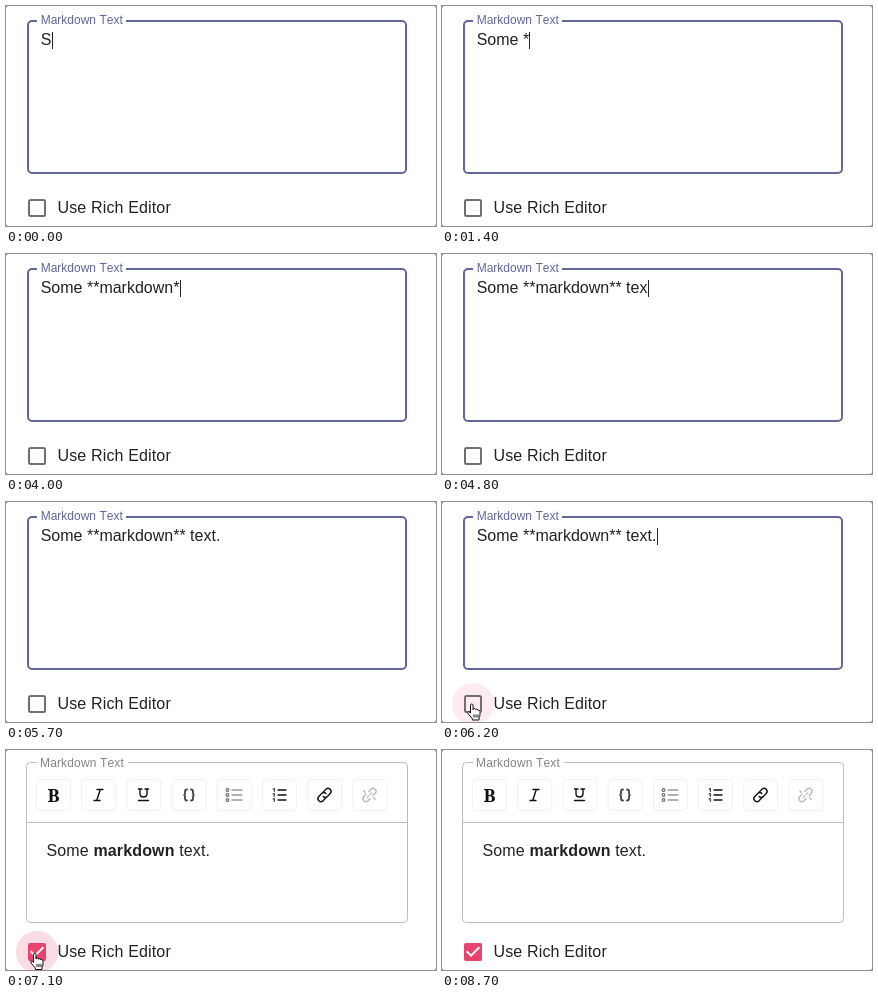
Animation, 430 px wide and 220 px high, one loop 8.9 s. Source, as an HTML page:

```html
<!DOCTYPE html>
<html lang="en">
<head>
<meta charset="utf-8">
<title>Markdown field</title>
<style>
  html, body { margin: 0; width: 100%; height: 100%; overflow: hidden; background: #8a8a8a; }
  svg { display: block; width: 430px; height: 220px; }
  text { font: 16px "Liberation Sans", Arial, sans-serif; fill: #222; white-space: pre; font-kerning: none; }
  .spaced { letter-spacing: .15px; }
  .label { font-size: 12px; }
  .muted { fill: #858585; }
  .serif { font: bold 18px "Noto Serif", serif; text-anchor: middle; fill: #111; }
  .line { fill: none; stroke: #bebebe; }
  .icon { fill: none; stroke: #111; stroke-width: 1.4; stroke-linecap: round; }
</style>
</head>
<body>
<svg viewBox="0 0 430 220">
  <rect width="430" height="220" rx="2.5" fill="#fff"/>

  <g id="plain">
    <rect id="border" x="22" y="15" width="378" height="152" rx="4" fill="none"/>
    <rect x="31" y="10" width="89" height="9" fill="#fff"/>
    <text id="label" class="label" x="34.7" y="18">Markdown Text</text>
    <text id="typed" x="34.7" y="39"></text>
    <rect id="caret" y="26" width="1" height="17" fill="#222"/>
  </g>

  <g id="rich">
    <rect class="line" x="20.5" y="12.5" width="381" height="160" rx="4"/>
    <rect x="31" y="8" width="91" height="9" fill="#fff"/>
    <text class="label spaced muted" x="34" y="17">Markdown Text</text>
    <path class="line" d="M20 72.5H402"/>
    <g id="buttons" fill="none" stroke="#f0f0f0"></g>
    <text class="serif" x="47.5" y="51.5">B</text>
    <path class="icon" d="M91 39.5H97M88 50.5H94M94.3 39.5L90.7 50.5"/>
    <path class="icon" d="M132.5 39H136M139 39H142.5M134 39V43.5Q134 47 137.5 47T141 43.5V39M132.5 50.5H142.5"/>
    <path class="icon" stroke-width="1.8" style="stroke:#444;stroke-width:1.8"
      d="M181 39.5Q179 39.5 179 41.5V43.5Q179 45 177.5 45Q179 45 179 46.5V48.5Q179 50.5 181 50.5
         M185 39.5Q187 39.5 187 41.5V43.5Q187 45 188.5 45Q187 45 187 46.5V48.5Q187 50.5 185 50.5"/>
    <g id="bullets" class="icon" style="stroke:#666;stroke-width:1.1"></g>
    <g id="numbers" class="icon"></g>
    <g class="icon" transform="translate(318.5 45) rotate(-45)">
      <path d="M-1 3H-5A3 3 0 0 1-5-3H-1A3 3 0 0 1 2 0M1-3H5A3 3 0 0 1 5 3H1A3 3 0 0 1-2 0"/>
    </g>
    <g class="icon" style="stroke:#bbb" transform="translate(363.5 45) rotate(-45)">
      <path d="M-2 3H-5A3 3 0 0 1-5-3H-2M2-3H5A3 3 0 0 1 5 3H2M-1-5V-7M1 5V7M-3 0H-1M1 0H3"/>
    </g>
    <text class="spaced" x="40.4" y="106">Some <tspan font-weight="bold">markdown</tspan> text.</text>
  </g>

  <circle id="hover" cx="31" cy="202" r="21" fill="#fdebef"/>
  <circle id="ripple" cx="31" cy="202" fill="#fadce6"/>
  <rect id="unchecked" x="23" y="194" width="16" height="16" rx="1.5" fill="none" stroke="#707070" stroke-width="2"/>
  <g id="checked">
    <rect x="22" y="193" width="18" height="18" rx="2" fill="#e8436d"/>
    <path d="M24.7 201.3L29 205.6L37.3 197.3" fill="none" stroke="#fff" stroke-width="2"/>
  </g>
  <text class="spaced" x="51.5" y="207">Use Rich Editor</text>
  <path id="hand" fill="#fff" stroke="#111" stroke-linejoin="round"
    d="M3.5 9.5V1.8Q3.5.5 4.7.5T6 1.8V6Q6.2 5 7.3 5T8.6 6.3Q9 5.5 9.9 5.7T11 7Q11.4 6.4 12.2 6.7T13 8V11
       Q13 13 12 14.3V16.5H5.3V15L1 10Q.2 8.8 1.1 8.3T3.5 9.5ZM7 11V14M9 11V14M11 11V14"/>
</svg>
<script>
const $ = id => document.getElementById(id);
const show = (id, on) => $(id).style.display = on ? '' : 'none';
const clamp = v => Math.max(0, Math.min(1, v));
const between = (t, a, b) => t >= a && t < b;

const LOOP = 8900;
const TEXT = 'Some **markdown** text.';
// Time in tenths of a second at which each character appears.
const KEYS = [0, 1, 3, 4, 5, 14, 15, 20, 21, 22, 23, 27, 28, 29, 31, 40, 41, 43, 45, 46, 48, 50, 52];
const BLINKS = [[1000, 1400], [3600, 4000], [5700, 6200]];
const BLUR = 6700, CHECK = 6800, SWITCH = 6900, LEAVE = 8300;

const rows = [40, 45, 50];
$('buttons').innerHTML = Array.from({ length: 8 }, (_, i) =>
  `<rect x="${30.5 + 45.2 * i}" y="29.5" width="34" height="31" rx="4"/>`).join('');
$('bullets').innerHTML = rows.map(y =>
  `<circle cx="221.5" cy="${y}" r="1.4"/><path d="M226 ${y}H236"/>`).join('');
$('numbers').innerHTML = rows.map(y =>
  `<path d="M272 ${y}H280"/><path stroke-width="1" d="M267 ${y - 1}L268.3 ${y - 1.6}V${y + 1.4}"/>`).join('');

const ruler = document.createElement('canvas').getContext('2d');
ruler.font = '16px "Liberation Sans", Arial, sans-serif';
ruler.fontKerning = 'none';

function handPosition(t) {
  if (t >= 8200) return [19, 195];
  if (t >= 6400) return [24, 203];
  const rest = 1 - clamp((t - 5700) / 400);
  return [25 + 4 * rest * rest, 201.5 + 22 * rest * rest];
}

function render(time) {
  const t = Math.floor(time / 100) * 100;
  const focused = t < BLUR;
  const text = TEXT.slice(0, KEYS.filter(k => k * 100 <= t).length);

  show('plain', t < SWITCH);
  show('rich', t >= SWITCH);
  $('typed').textContent = text;
  $('caret').setAttribute('x', Math.round(35 + ruler.measureText(text).width));
  show('caret', focused && !BLINKS.some(([a, b]) => between(t, a, b)));

  const border = $('border'), inset = focused ? 22 : 21.5;
  border.setAttribute('x', inset);
  border.setAttribute('y', inset - 7);
  border.setAttribute('width', focused ? 378 : 379);
  border.setAttribute('height', focused ? 152 : 153);
  border.setAttribute('stroke', focused ? '#62669b' : '#bebebe');
  border.setAttribute('stroke-width', focused ? 2 : 1);
  $('label').style.fill = focused ? '#62669b' : '#858585';

  show('unchecked', t < CHECK);
  show('checked', t >= CHECK);
  show('hover', between(t, 5900, LEAVE));
  $('hover').style.opacity = clamp((t - 5800) / 200);
  show('ripple', between(t, SWITCH, LEAVE));
  $('ripple').setAttribute('r', 21 * clamp((t - CHECK) / 300));

  show('hand', between(t, 5800, LEAVE));
  $('hand').setAttribute('transform', `translate(${handPosition(t)})`);
}

const start = performance.now();
function tick() {
  render((performance.now() - start) % LOOP);
  requestAnimationFrame(tick);
}
tick();
</script>
</body>
</html>
```
